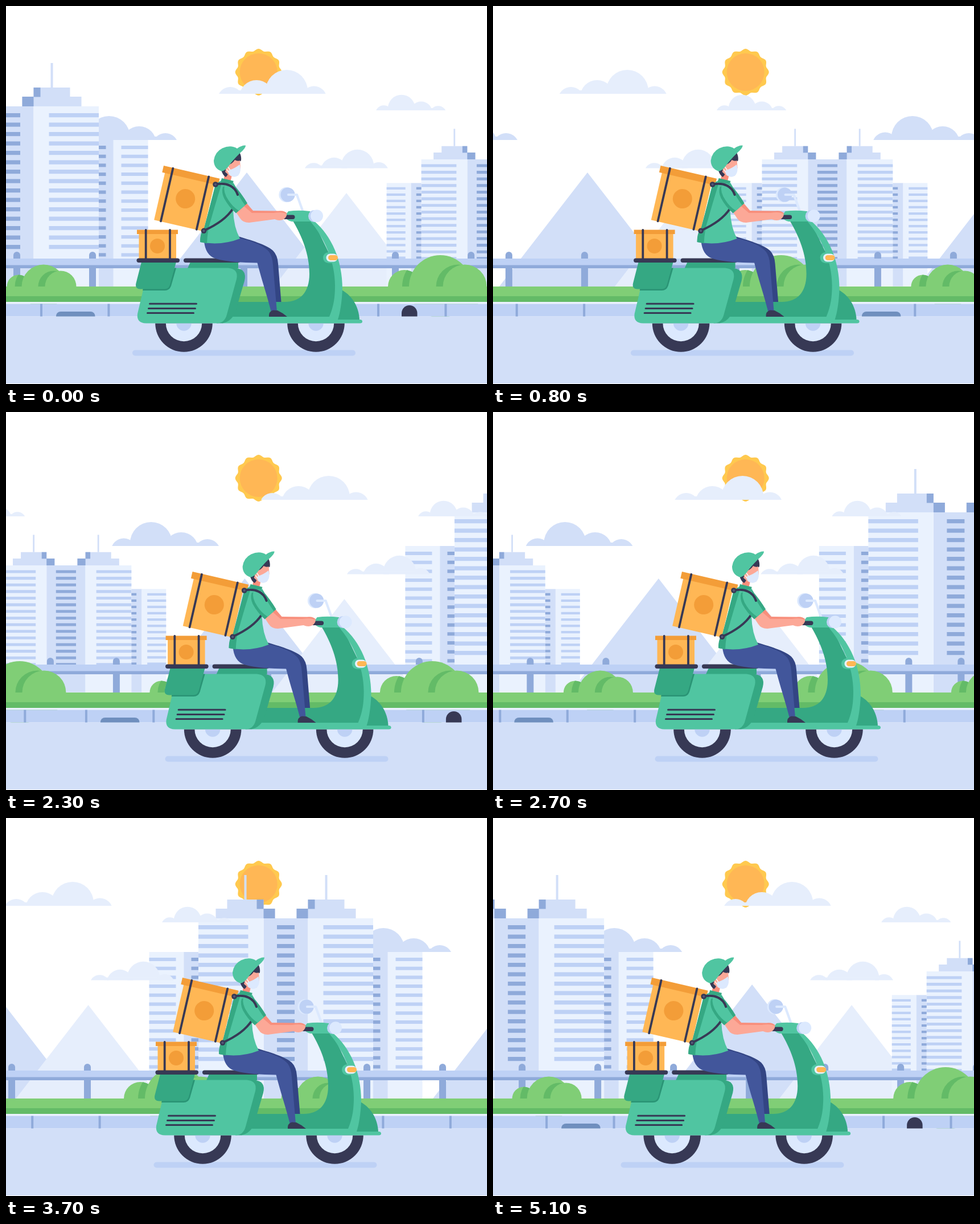
Recreate the animation shown at these times as an HTML page with a canvas. Size 845x663 px, loop 5200 ms.

```html
<!DOCTYPE html>
<html lang="en">
<head>
<meta charset="utf-8">
<title>Scooter delivery</title>
<style>
  html, body { margin: 0; width: 100%; height: 100%; overflow: hidden; background: #fff; }
  canvas { display: block; }
</style>
</head>
<body>
<canvas id="stage" width="845" height="663"></canvas>
<script>
const ctx = document.getElementById('stage').getContext('2d');
const LOOP = 5200, STEP = 100, SCENE = 1671;
const C = {
  pale: '#eaf2fe', cloud: '#e6eefc', haze: '#d2dff8', sky: '#bed1f5', steel: '#8faada', glass: '#dce9fe',
  drain: '#6f8fbe', ink: '#373955', leaf: '#80ce76', leafDark: '#63bb67',
  mint: '#50c5a1', green: '#35a883', deep: '#2a9475', amber: '#ffb755', orange: '#f39d38', sun: '#ffc94f',
  skin: '#fca897', blush: '#f88f7c', denim: '#42569b', navy: '#334584'
};

function rect(color, x, y, w, h, r = 0) {
  ctx.fillStyle = color;
  ctx.beginPath();
  ctx.roundRect(x, y, w, h, r);
  ctx.fill();
}
function disc(color, x, y, r, end = Math.PI * 2) {
  ctx.fillStyle = color;
  ctx.beginPath();
  ctx.arc(x, y, r, 0, end);
  ctx.fill();
}
function shape(color, d) {
  ctx.fillStyle = color;
  ctx.fill(new Path2D(d));
}
function line(color, width, d) {
  ctx.strokeStyle = color;
  ctx.lineWidth = width;
  ctx.lineCap = ctx.lineJoin = 'round';
  ctx.stroke(new Path2D(d));
}
function group(x, y, sx, sy, draw) {
  ctx.save();
  ctx.translate(x, y);
  ctx.scale(sx, sy);
  draw();
  ctx.restore();
}
function rows(color, count, x, y, w, h, gap) {
  for (let i = 0; i < count; i++) rect(color, x, y + i * gap, w, h);
}
function series(start, gap, count, draw) {
  for (let i = 0; i < count; i++) draw(start + i * gap);
}

// ---- scenery ----
function drawSun() {
  ctx.beginPath();
  for (let a = 0; a < 360; a += 2) {
    const t = a * Math.PI / 180, r = 39.2 + 1.8 * Math.cos(12 * t);
    ctx.lineTo(443.7 + r * Math.sin(t), 116 - r * Math.cos(t));
  }
  ctx.fillStyle = C.sun;
  ctx.fill();
  disc(C.amber, 443.7, 116, 33);
}

function cloud(x, base, scale, flip, color) {
  group(flip ? x + 188 * scale : x, base, flip ? -scale : scale, scale, () => {
    ctx.beginPath();
    ctx.rect(-5, -60, 200, 60);
    ctx.clip();
    disc(color, 20, 10.7, 22.7);
    disc(color, 66, 6, 30);
    disc(color, 119, -5, 37);
    disc(color, 167, 9, 22.5);
    rect(color, 30, -6, 125, 6);
  });
}

function mountain(x, top, color) {
  const half = (492 - top) * 0.775;
  shape(color, `M${x} ${top}L${x + half} 492H${x - half}Z`);
}

function city(x, top, scale, mid) {
  group(x, top, scale, scale, () => {
    rect(C.haze, -mid, 0, mid * 2, 316);
    rows(C.steel, 15, 23.5 - mid, 12, 2 * mid - 47, 7.2, 16.5);
    for (const side of [-1, 1]) group(side * mid, 0, side, 1, () => {
      rect(C.pale, 0, 0, 114.5, 316);
      rows(C.sky, 15, 27, 12, 87.5, 7.2, 16.5);
      rect(C.haze, -20, -17, 104, 17);
      rect(C.steel, -20, -17, 20, 17);
      rect(C.haze, 0, -33, 64, 16.5);
      rect(C.steel, 0, -33, 12, 16.5);
      rect(C.haze, 30, -76, 4, 43);
      rect(C.haze, 114.5, 59, 26, 257);
      rect(C.pale, 140, 59, 61, 257);
      rows(C.steel, 13, 114.5, 69, 12.5, 6, 15.7);
      rows(C.sky, 13, 154, 69, 47, 6, 15.7);
    });
  });
}

// Three mounds, each casting a shadow on the one before it.
function bush(...mounds) {
  mounds.forEach(([x, r], i) => {
    if (i) {
      ctx.save();
      ctx.beginPath();
      ctx.arc(mounds[i - 1][0], 492, mounds[i - 1][1], Math.PI, 0);
      ctx.clip();
      disc(C.leafDark, x - 12, 492, r);
      ctx.restore();
    }
    disc(C.leaf, x, 492, r);
  });
}
const lowBush = x => bush([x + 22, 20.5], [x + 66, 38.5], [x + 96, 27.5]);
const highBush = x => bush([x + 29, 29], [x + 92, 55], [x + 135, 38.5]);

function railPost(x) { rect(C.steel, x - 6, 431, 12, 62, [6, 6, 0, 0]); }
function barrierPost(x) { rect(C.steel, x - 2, 522.5, 4, 22); }
function drain(x) { rect(C.drain, x, 536, 68.5, 8.5, [8, 8, 0, 0]); }
function culvert(x) { rect(C.ink, x, 525, 27.5, 19.5, [13.7, 13.7, 0, 0]); }

function drawScenery(offset) {
  const scroll = draw => [-offset, SCENE - offset].forEach(x => group(x, 0, 1, 1, draw));

  drawSun();
  scroll(() => {
    for (const x of [112, 925]) cloud(x, 235, 1, true, C.haze);
    for (const x of [423, 1158.5]) mountain(x, 292, C.haze);
    for (const x of [598, 1333.5]) mountain(x, 328, C.cloud);
  });
  scroll(() => {
    city(9.5, 176, 1, 39);
    city(844.5, 269, 0.705, 48.5);
  });
  scroll(() => {
    for (const x of [0, 813]) {
      cloud(374 + x, 154, 1, false, C.cloud);
      cloud(650 + x, 183, 0.65, true, C.cloud);
      cloud(525 + x, 284.5, 0.777, false, C.cloud);
    }
    series(19, 133, 7, railPost);
    series(933, 133, 6, railPost);
  });
  rect(C.sky, 0, 443, 845, 12);
  rect(C.steel, 0, 454.5, 845, 5.5);
  scroll(() => {
    [0, 990].forEach(lowBush);
    [671, 1396].forEach(highBush);
  });
  rect(C.leaf, 0, 492, 845, 17);
  rect(C.leafDark, 0, 509, 845, 10);
  rect(C.pale, 0, 519, 845, 3.5);
  rect(C.sky, 0, 522.5, 845, 22);
  rect(C.haze, 0, 544.5, 845, 117.5);
  scroll(() => {
    series(62, 118.4, 7, barrierPost);
    series(880, 118.4, 7, barrierPost);
    [88, 905].forEach(drain);
    [695, 1512].forEach(culvert);
  });
  rect('#fff', 0, 662, 845, 1);
}

// ---- scooter ----
function wheel(x) {
  disc(C.ink, x, 556.5, 50.3, Math.PI);
  disc(C.glass, x, 556.5, 31.7, Math.PI);
  disc(C.sky, x, 556.5, 13.2, Math.PI);
}

function drawScooter() {
  wheel(312.5);
  wheel(544.5);

  // mirror, front fender, floor and leg shield
  disc(C.glass, 492.5, 331, 13.2);
  disc(C.sky, 495, 331, 12.6);
  line(C.glass, 4.2, 'M496 331H511L524 367');
  shape(C.green, 'M586 496C607 506 620 526 621 551H575Z');
  shape(C.green, 'M390 519H490C516 519 533 503 533 470C533 435 520 404 504 377H540L585 470L580 546H390Z');
  shape(C.mint, 'M534 377H541C572 403 591 446 591 496C590 520 587 538 583 550H622Q626 550 626 553.5Q626 556.5 622 556.5H380V545H568C576 526 578 510 578 490C578 446 558 405 534 377Z');
  rect(C.mint, 557, 432, 25, 19, 9.5);
  rect(C.pale, 562.5, 434.5, 20, 14, 7);
  rect(C.amber, 566, 437, 17, 9, 4.5);

  // rear body
  shape(C.green, 'M324 449L319 460H408V449Z');
  shape(C.green, 'M385 459.5H402Q424 461 419 482L404 533Q398 553 380 556.5H370Z');
  shape(C.mint, 'M250 459.5H390Q409 461 405 479L388 541Q384 556.5 370 556.5H246Q229 556 231 540Z');
  shape(C.deep, 'M250 459.5H299L290 491Q287 499 279 499H240Z');
  shape(C.green, 'M238 449H299L288 489Q286 496.5 278 496.5H236Q226 496 228.5 486Z');
  line(C.ink, 3, 'M252.5 522.3H334.5M250.5 530.5H332.5M248.5 538.6H329.5');
  rect(C.ink, 312, 442.5, 100, 7.5, 3.7);

  // small parcel
  rect(C.amber, 233.5, 398, 65.5, 45);
  rect(C.orange, 230, 392.5, 72, 7.5);
  disc(C.orange, 266, 421, 13);
  line(C.ink, 3.8, 'M245.7 393V443M288 393V443');
  rect(C.ink, 229.5, 442.5, 75.5, 7.5, 3.7);
}

function drawBackpack() {
  ctx.save();
  ctx.translate(277, 280);
  ctx.rotate(13 * Math.PI / 180);
  rect(C.amber, 5, 10, 89, 86.5);
  rect(C.orange, 0, 0, 101, 12);
  disc(C.orange, 50.3, 48, 17);
  line(C.ink, 3.8, 'M17 1V96M81.5 1V96');
  ctx.restore();
}

function drawRider() {
  // legs and shoe
  shape(C.navy, 'M405 403C430 411 457 418 469 429Q477 437 478 452L483.5 519H470L452 445Z');
  shape(C.denim, 'M348 412L410 407C430 412 452 419 462 431Q468 439 469 454L476 536L466 537C459 509 449 480 441.5 450.5C415 450 390 449.5 368 443Q350 437 348 412Z');
  shape(C.ink, 'M462 545Q461 536 469 533.5L477 534Q486 538 494 545Z');

  // neck and shirt
  shape(C.blush, 'M385 290L382 307L394 309L397 297Z');
  shape(C.mint, 'M378 306L399 309Q408 322 405 338L399 358Q400 388 411 408Q378 421 341 414Q342 396 348 392L368 312Z');
  shape(C.green, 'M375 308L367 318L347 393Q341 397 341 414L353 416.5Q354 392 360 375Q367 350 378 314Z');
  shape(C.green, 'M379 302L400 307L397 312L377 309Z');
  line(C.ink, 4, 'M399 355C388 372 368 385 347.5 394');

  // bare arm on the grip
  rect(C.ink, 484, 366.5, 24, 7.5, 3.7);
  line(C.ink, 2.8, 'M469 372.5H490');
  shape(C.mint, 'M496 360Q514 357.5 534 360Q543 369 535 378H502Q492 376 490 368Z');
  rect(C.ink, 486, 366.5, 21.5, 7.5, 3.7);
  disc(C.sky, 541.5, 368.5, 10.5);
  disc(C.glass, 546, 368.3, 11);
  shape(C.blush, 'M415 350L422 345L434 359L478 359.5Q489 358 494 364L470 371L430 370Z');
  shape(C.skin, 'M403 360L418 351L432 363L470 363Q485 360 493 365Q494 369 488 374Q481 378 472 374L427 380Q416 380 411 372Z');

  // sleeve
  shape(C.green, 'M381 317Q378 326 383 337Q391 352 404 363.5L424 346Q414 329 399 312Z');
  shape(C.mint, 'M384 314Q381 327 391 341Q398 352 409 359L420 349.5Q408 333 399 314Z');
  line(C.ink, 4, 'M368 313C388 309 402 316 407 331');
  disc(C.ink, 368, 313, 4.8);
  disc(C.ink, 347.5, 394.3, 4.8);
  disc('#55597a', 368, 313, 2);
  disc('#55597a', 347.5, 394.3, 2);

  // head
  shape(C.ink, 'M378 287Q380 296 386 300Q391 296 391 289L413 271Q414 262 409 255L390 266Z');
  shape(C.skin, 'M389 279Q398 277 402 270Q407 273 411 271L412 284L407 298L392 297L385 291Z');
  disc(C.skin, 388, 283, 4.2);
  line('#fff', 1.3, 'M389 281L394 288M388 287L393 294');
  shape(C.glass, 'M391.5 288Q402 285 410.5 278Q414 289 409 296Q402 303 393 297Q390 293 391.5 288Z');
  shape(C.mint, 'M379 290Q365 285 365 271Q367 256 380 249.5Q395 243 406 250Q414 244 421 244.5Q421.5 249 411 258Q397 272 391 281Q386 288 379 290Z');
}

function render(ms) {
  const t = Math.floor(ms % LOOP / STEP) * STEP / LOOP;
  const drift = 1 - Math.abs(1 - 2 * t);
  rect('#fff', 0, 0, 845, 663);
  drawScenery(t * SCENE);
  rect(C.sky, 222 + 65 * drift, 603.5, 392, 10, 5);
  group(57.2 * drift, 0, 1, 1, () => {
    drawScooter();
    drawBackpack();
    drawRider();
  });
}

const begin = performance.now();
function tick() {
  render(performance.now() - begin);
  requestAnimationFrame(tick);
}
tick();
</script>
</body>
</html>
```
